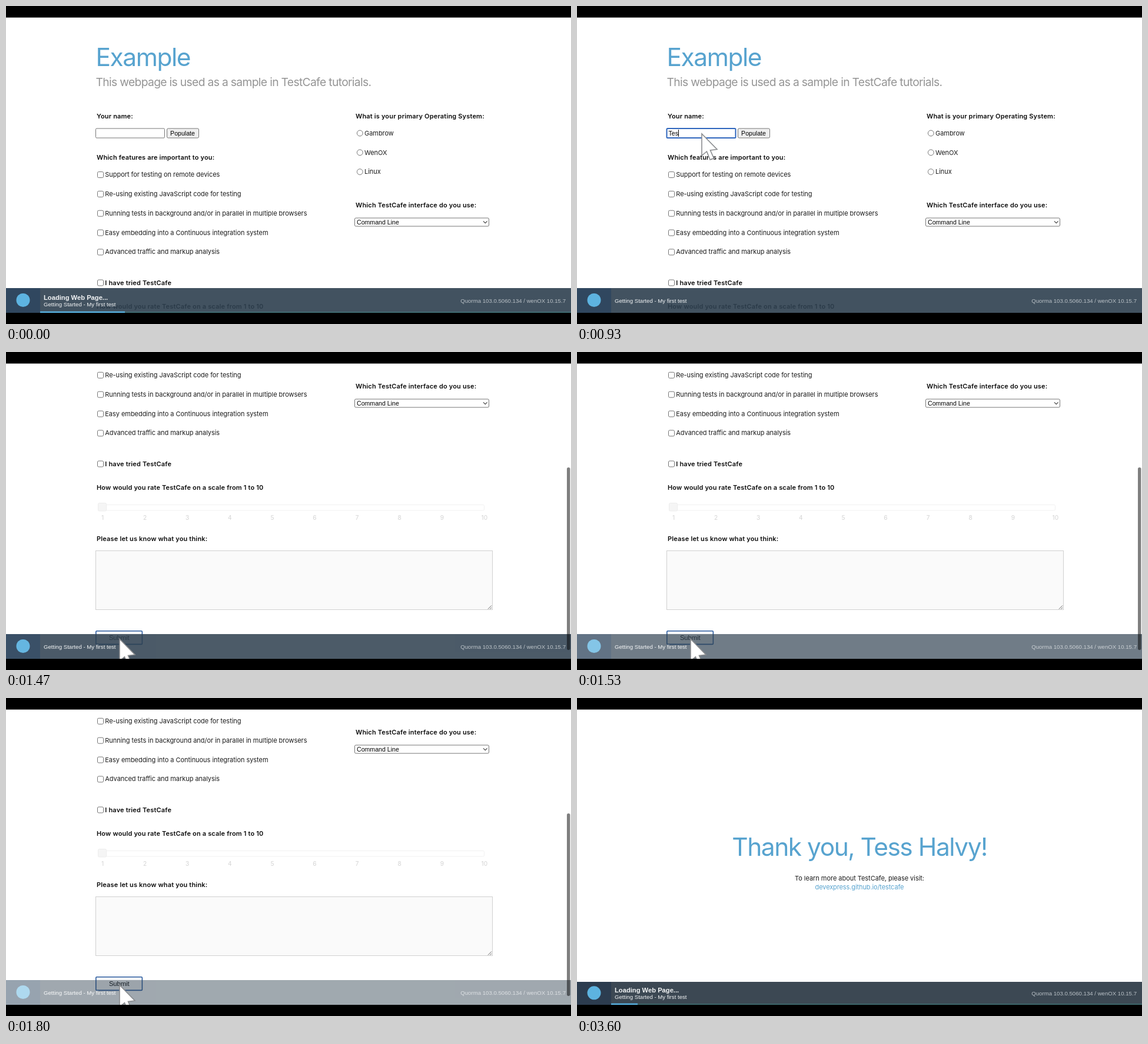
These frames come from a looping animation (960 px wide and 540 px high, 4.27 s). An HTML page:

```html
<!DOCTYPE html>
<html lang="en">
<head>
<meta charset="utf-8">
<title>Form test run</title>
<style>
  html, body { margin: 0; width: 100%; height: 100%; overflow: hidden; background: #000; }
  svg { display: block; width: 960px; height: 540px; }
  text { font-family: Inter, "Open Sans", sans-serif; font-size: 11px; font-optical-sizing: none; fill: #1c1c1c; white-space: pre; }
  .body { letter-spacing: -.004em; }
  .label { font-weight: 600; letter-spacing: .015em; fill: #0c0c0c; }
  .title { font-size: 42.5px; letter-spacing: -.035em; fill: #57a3cf; }
  .sub { font-size: 19.3px; letter-spacing: -.035em; fill: #959595; }
  .link { fill: #57a3cf; letter-spacing: -.01em; }
  .ui { font-family: "Liberation Sans", Arial, sans-serif; font-size: 10.6px; fill: #000; }
  .submit { font-size: 11.2px; }
  .tick { font-size: 10px; font-weight: 500; fill: #d9d9d9; text-anchor: middle; }
  .mid { text-anchor: middle; }
  .bar text { font-family: "Liberation Sans", Arial, sans-serif; font-size: 9.65px; fill: #f3f5f6; }
  .bar .loading { font-size: 11.2px; font-weight: 700; }
  .bar .agent { fill: #b9c0c6; text-anchor: end; }
  .box { fill: #fff; stroke: #767676; stroke-width: 1; }
  .focused { stroke: #2f66bd; stroke-width: 2; }
</style>
</head>
<body>
<svg id="stage" viewBox="0 0 960 540"></svg>
<script>
const LOOP = 4270, STEP = 200 / 3, END = 3340;
const NAME = "Tess Halvy";

const text = (x, y, s, cls = "body", id = "") =>
  `<text x="${x}" y="${y}" class="${cls}"${id && ` id="${id}"`}>${s}</text>`;
const rect = (x, y, w, h, attrs) =>
  `<rect x="${x}" y="${y}" width="${w}" height="${h}" ${attrs}/>`;
const check = (y, s, cls) =>
  rect(155.5, y - 4.5, 10, 10, 'class="box" rx="2"') + text(168.3, y + 4, s, cls);
const radio = (y, s) =>
  `<circle cx="601.3" cy="${y + .2}" r="4.9" class="box"/>` + text(609, y + 4, s);

const features = [
  "Support for testing on remote devices",
  "Re-using existing JavaScript code for testing",
  "Running tests in background and/or in parallel in multiple browsers",
  "Easy embedding into a Continuous integration system",
  "Advanced traffic and markup analysis"
];
const ticks = Array.from({ length: 10 }, (_, i) => text(164 + i * 72.1, 564.5, i + 1, "tick"));

const form = `
  ${text(152.5, 101.5, "Example", "title")}
  ${text(152.5, 135.5, "This webpage is used as a sample in TestCafe tutorials.", "sub")}
  ${text(154, 190.7, "Your name:", "label")}
  ${rect(152.5, 208, 117, 16, 'class="box" rx="1.5" id="field"')}
  ${text(155.5, 219.5, "", "ui", "typed")}
  ${rect(0, 210, 1, 12, 'id="caret"')}
  ${rect(273.5, 208, 54, 16, 'rx="2" fill="#efefef" stroke="#767676"')}
  ${text(300, 219.7, "Populate", "ui mid")}
  ${text(154, 261, "Which features are important to you:", "label")}
  ${features.map((s, i) => check(286 + i * 32.85, s)).join("")}
  ${check(469.5, "I have tried TestCafe", "label")}
  ${text(594, 190.7, "What is your primary Operating System:", "label")}
  ${["Gambrow", "WenOX", "Linux"].map((s, i) => radio(215.8 + i * 32.8, s)).join("")}
  ${text(594, 342, "Which TestCafe interface do you use:", "label")}
  ${rect(592.5, 360, 228, 14, 'class="box" rx="2"')}
  ${text(596, 370.8, "Command Line", "ui")}
  <path d="M811 365.4l3.3 3.3 3.3-3.3" fill="none" stroke="#444" stroke-width="1.2"/>
  ${text(154, 514.3, "How would you rate TestCafe on a scale from 1 to 10", "label")}
  ${rect(156.5, 539.5, 656, 9.5, 'fill="#fff" stroke="#f1f1f1" rx="2"')}
  ${rect(156.5, 536.5, 14, 13.5, 'fill="#f5f5f5" stroke="#ededed" rx="2"')}
  ${ticks.join("")}
  ${text(154, 600.7, "Please let us know what you think:", "label")}
  ${rect(152.5, 617.5, 674, 100, 'fill="#fafafa" stroke="#d0d0d0"')}
  <path d="M819 716.5l6-6m-2.5 6l2.5-2.5" stroke="#555" stroke-width=".9"/>
  ${rect(152.8, 753.8, 78.6, 22.6, 'rx="1.5" fill="#f7f7f7" id="submit"')}
  ${text(192.3, 768.8, "Submit", "ui submit mid")}`;

const thanks = `
  ${text(480, 268, `Thank you, ${NAME}!`, "title mid")}
  ${text(480, 309.7, "To learn more about TestCafe, please visit:", "body mid")}
  ${text(480, 325.3, "devexpress.github.io/testcafe", "link mid")}`;

const bar = `
  ${rect(0, 479, 960, 43, 'id="back"')}
  ${rect(0, 479, 58, 43, 'id="corner"')}
  <circle id="badge" cx="29" cy="499.5" r="11.5" fill="#5db3e0"/>
  ${text(64, 499, "Loading Web Page...", "loading", "loading")}
  ${text(64, 510, "Getting Started - My first test", "", "testName")}
  ${text(951, 503.6, "Quorma 103.0.5060.134 / wenOX 10.15.7", "agent", "agent")}
  <g id="progress">
    ${rect(58, 519, 902, 2, 'fill="#3f9f95" opacity=".35"')}
    ${rect(58, 518.6, 0, 2.4, 'fill="#57b2e2" id="done"')}
  </g>`;

document.getElementById("stage").innerHTML = `
  <clipPath id="view">${rect(0, 19, 960, 502, "")}</clipPath>
  ${rect(0, 0, 960, 540, 'fill="#000"')}
  <g clip-path="url(#view)">
    ${rect(0, 19.6, 960, 502, 'fill="#fff"')}
    <g id="form">${form}</g>
    <g id="thanks">${thanks}</g>
    <g id="bar" class="bar">${bar}</g>
    ${rect(953, 0, 5.5, 310, 'rx="2.7" fill="#000" fill-opacity=".5" id="thumb"')}
    <path id="cursor" d="M0 0V37L8.5 30L14 44L20.5 41.5L14.5 28L26 26.5Z"
      fill="#fff" stroke="#8b8d90" stroke-width="1.6"/>
  </g>`;

const el = Object.fromEntries([...document.querySelectorAll("[id]")].map(e => [e.id, e]));
const set = (id, attrs) => {
  for (const k in attrs) el[id].setAttribute(k, attrs[k]);
};
const show = (id, on) => set(id, { display: on ? "inline" : "none" });
const ramp = (t, a, b) => Math.min(1, Math.max(0, (t - a) / (b - a)));
const mix = (a, b, p) => a + (b - a) * p;

function snap(t) {
  const start = k => Math.round(k * STEP / 10) * 10;
  let k = Math.ceil(t / STEP);
  while (k > 0 && start(k) > t) k--;
  return start(k);
}

function drawField(t) {
  const focused = t >= 860;
  const n = Math.floor(Math.max(0, Math.min(NAME.length, (t - 855) / 25)));
  el.typed.textContent = NAME.slice(0, n);
  el.field.classList.toggle("focused", focused);
  show("caret", focused);
  set("caret", { x: 155.5 + (n ? el.typed.getComputedTextLength() : 0) });
}

function drawCursor(t) {
  const p = ramp(t, 640, 860), q = ramp(t, 1290, 1450);
  const x = mix(mix(480, 212, p), 193, q);
  const y = mix(mix(270, 217, p), 487.5, q);
  set("cursor", { transform: `translate(${x} ${y})` });
}

function drawBar(t, ended) {
  const loading = t < 660 || ended;
  const drop = ended ? 1.3 : 0;
  const p = ramp(t, END, 3600);
  const fade = t < 1460 || ended ? 1
    : .47 + .48 * Math.exp((1470 - Math.min(t, 1800)) / 118);
  const top = ended ? 482 : 479;
  set("bar", { opacity: fade });
  set("back", {
    y: top,
    fill: ended ? "#3c4853" : "#2e404f",
    "fill-opacity": ended ? mix(.955, 1, p) : .9
  });
  set("corner", {
    y: top,
    fill: ended ? `rgb(${mix(48, 44, p)},${mix(70, 60, p)},${mix(94, 79, p)})` : "#30475f"
  });
  set("badge", { cy: 499.5 + drop });
  set("loading", { y: 499 + drop });
  set("testName", { y: loading ? 510 + drop : 503.6 });
  set("agent", { y: 503.6 + drop });
  show("loading", loading);
  show("progress", loading);
  const end = ended ? 103 : t < 600 ? mix(202, 528, t / 530) : 960;
  set("done", { width: end - 58 });
}

function draw(t, ended) {
  const scroll = 280 * ramp(t, 1100, 1300);
  const pressed = t >= 1450;
  show("form", !ended);
  show("thanks", ended);
  show("cursor", t >= 660 && !ended);
  show("thumb", scroll > 0 && !ended);
  set("form", { transform: `translate(0 ${-scroll})` });
  set("submit", { stroke: pressed ? "#2a5b9f" : "#a8a8a8", "stroke-width": pressed ? 1.6 : 1 });
  set("thumb", { y: 22 + scroll * .621 });
  drawField(t);
  drawCursor(t);
  drawBar(t, ended);
}

const begin = performance.now();
function tick() {
  const t = (performance.now() - begin) % LOOP;
  draw(snap(t), t >= END);
  requestAnimationFrame(tick);
}
tick();
</script>
</body>
</html>
```
